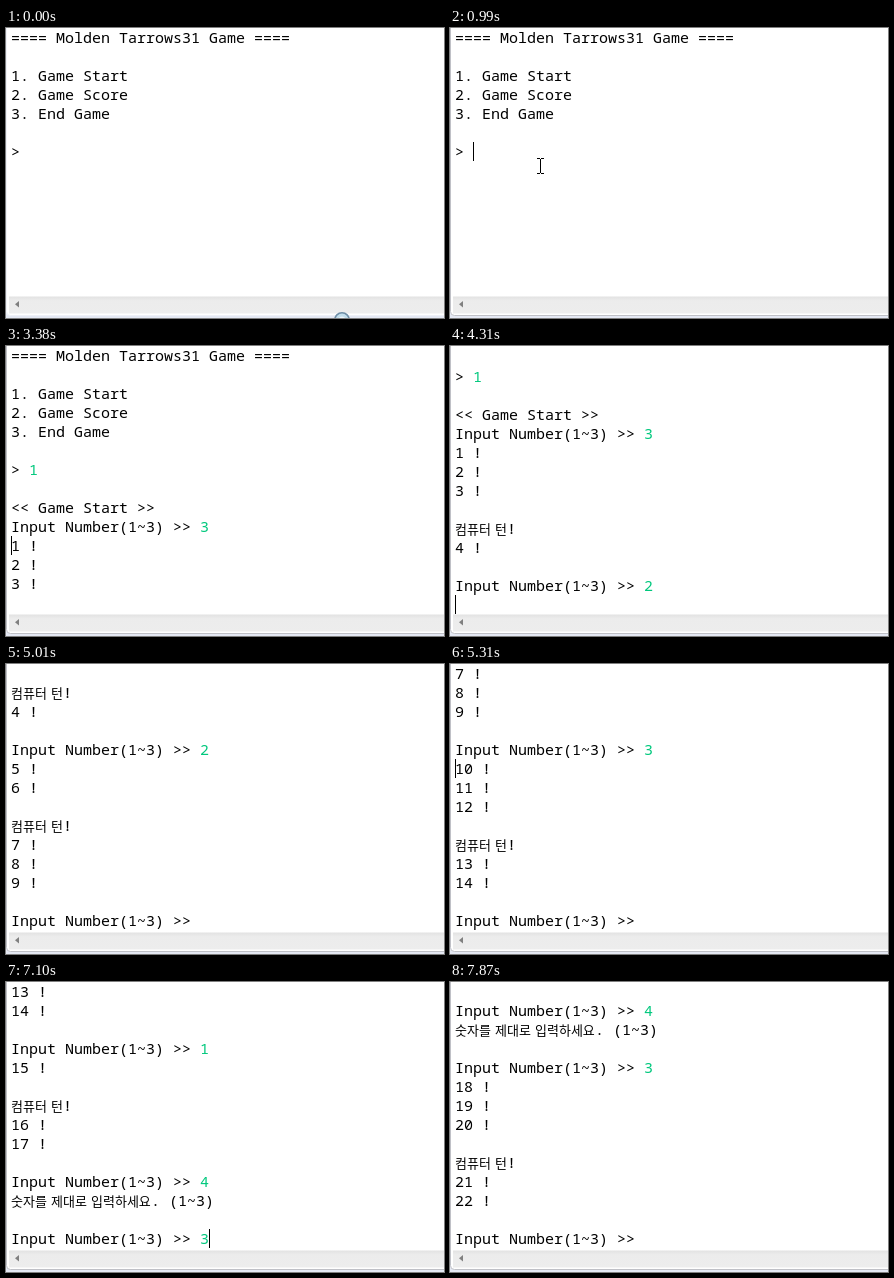
Animation, 438 px wide and 290 px high, one loop 8 s. Source, as an HTML page:

```html
<!DOCTYPE html>
<html lang="ko">
<head>
<meta charset="utf-8">
<title>Number game console</title>
<style>
  html, body { margin: 0; width: 100%; height: 100%; overflow: hidden; background: #e4e8f3; }
  svg { display: block; width: 438px; height: 290px; }
  text { font: 15px "Noto Sans Mono", "DejaVu Sans Mono", monospace; white-space: pre; fill: #000; }
  .ko { font: 13px "Noto Sans CJK KR", "Noto Sans CJK", sans-serif; }
  .typed { fill: #00c87d; }
  .crisp { shape-rendering: crispEdges; }
</style>
</head>
<body>
<svg viewBox="0 0 438 290">
  <defs>
    <clipPath id="view"><rect width="438" height="268"/></clipPath>
    <linearGradient id="track" x2="0" y2="1">
      <stop offset="0" stop-color="#e2e2e2"/>
      <stop offset=".25" stop-color="#ececec"/>
      <stop offset="1" stop-color="#ededed"/>
    </linearGradient>
  </defs>
  <path id="frame" d="M.5-2V283.5A4 4 0 0 0 4.5 287.5H440V-2Z" fill="#fff"/>
  <rect x="3" y="268.5" width="435" height="17" fill="url(#track)"/>
  <path d="M13 273v6.5l-4-3.25z" fill="#808080"/>
  <g clip-path="url(#view)">
    <g id="page">
      <g id="rows"></g>
      <rect id="caret" class="crisp" width="1" height="19"/>
    </g>
  </g>
  <g id="ring">
    <circle r="7.2" fill="#c3deec" stroke="#6f8ea6" stroke-width="1.6"/>
    <circle r="3.5" fill="#eef5fa"/>
  </g>
  <path id="beam" class="crisp" d="M-3-8h3v1h-3zM1-8h3v1h-3zM0-7h1v14h-1zM-3 7h3v1h-3zM1 7h3v1h-3z"/>
</svg>
<script>
const LOOP = 8000, ROW = 19, ROWS = 14, LEFT = 5, CHAR = 9;
const FOCUS = 990, STEP = 75, BLINK = 610;
const ASK = "Input Number(1~3) >> ";

const $ = id => document.getElementById(id);
const show = (el, on) => el.setAttribute("visibility", on ? "visible" : "hidden");
const move = (el, x, y) => el.setAttribute("transform", `translate(${x} ${y})`);

const lines = [
  "==== Molden Tarrows31 Game ====", "",
  "1. Game Start", "2. Game Score", "3. End Game", "", "> "
];
const answers = {};
const states = [];

// The caret stays lit for BLINK ms after it was set.
function cue(at, row, col = 0, set = at) {
  const end = Math.max(lines.length - 1, row);
  states.push({ at, row, col, set, end, shown: lines.length });
}

let total = 0;
const count = n => Array.from({ length: n }, () => `${++total} !`);

// Type a key, press Enter after `hold`, then print the answer and the computer's reply.
function turn(key, at, hold, reply) {
  const last = lines.length - 1, row = last + 1;
  const enter = at + hold, out = enter + STEP;
  answers[last] = { key, at };
  cue(at, last, lines[last].length + 1);
  cue(enter, row);
  if (reply) {
    lines.push(...count(key), "");
    cue(out, row);
    lines.push("컴퓨터 턴!", ...count(reply), "", ASK);
    cue(out + STEP, row, 0, out);
  } else {
    lines.push(...(key > 3 ? ["숫자를 제대로 입력하세요. (1~3)", ""] : ["", "<< Game Start >>"]), ASK);
    cue(out, row);
  }
}

cue(0, 6, 2, -BLINK);
cue(FOCUS, 6, 2, FOCUS - 100);
turn(1, 2050, 170);
turn(3, 3070, 230, 1);
turn(2, 4080, 230, 3);
turn(3, 5090, 70, 2);
turn(1, 5710, 150, 2);
turn(4, 6410, 150);
turn(3, 7100, 80, 2);

function add(parent, tag, attrs = {}, str = "") {
  const el = document.createElementNS("http://www.w3.org/2000/svg", tag);
  for (const name in attrs) el.setAttribute(name, attrs[name]);
  el.textContent = str;
  parent.append(el);
  return el;
}

const rows = lines.map((line, i) => {
  const g = add($("rows"), "g"), y = i * ROW + 15;
  let x = LEFT;
  for (const run of line.match(/[가-힣]+|[^가-힣]+/g) || []) {
    const ko = /[가-힣]/.test(run);
    add(g, "text", { x, y, class: ko ? "ko" : "" }, run);
    x += ko ? 12 * run.length : run === " " ? 4 : CHAR * run.length;
  }
  const answer = answers[i];
  if (answer) answer.el = add(g, "text", { x, y, class: "typed" }, answer.key);
  return g;
});

function drawMouse(t) {
  const p = Math.min(9, Math.max(0, Math.floor((t - 70) / STEP) + 1)) / 9;
  const e = p * p * (3 - 2 * p);
  const x = Math.round(336 - 246 * e), y = Math.round(292 - 154 * e);
  const inText = y < 268;
  move($("ring"), x, y);
  move($("beam"), x, y);
  show($("ring"), !inText);
  show($("beam"), inText && t < 2050);
}

function draw(t) {
  const s = states.findLast(s => s.at <= t);
  const top = Math.max(0, s.end - ROWS + 1);
  // A fresh caret row at the bottom is scrolled fully into view.
  const nudge = top && s.row === s.end && !s.col ? 2 : 0;
  move($("page"), 0, nudge - top * ROW);
  rows.forEach((g, i) => g.style.display = i < s.shown ? "" : "none");
  for (const { el, at } of Object.values(answers)) el.style.display = t >= at ? "" : "none";
  move($("caret"), LEFT + s.col * CHAR, s.row * ROW);
  show($("caret"), t < s.set + BLINK);
  $("frame").setAttribute("stroke", t < FOCUS ? "#eef0f7" : "#bfc0c6");
  drawMouse(t);
}

const start = performance.now();
function tick() {
  draw((performance.now() - start) % LOOP);
  requestAnimationFrame(tick);
}
tick();
</script>
</body>
</html>
```
